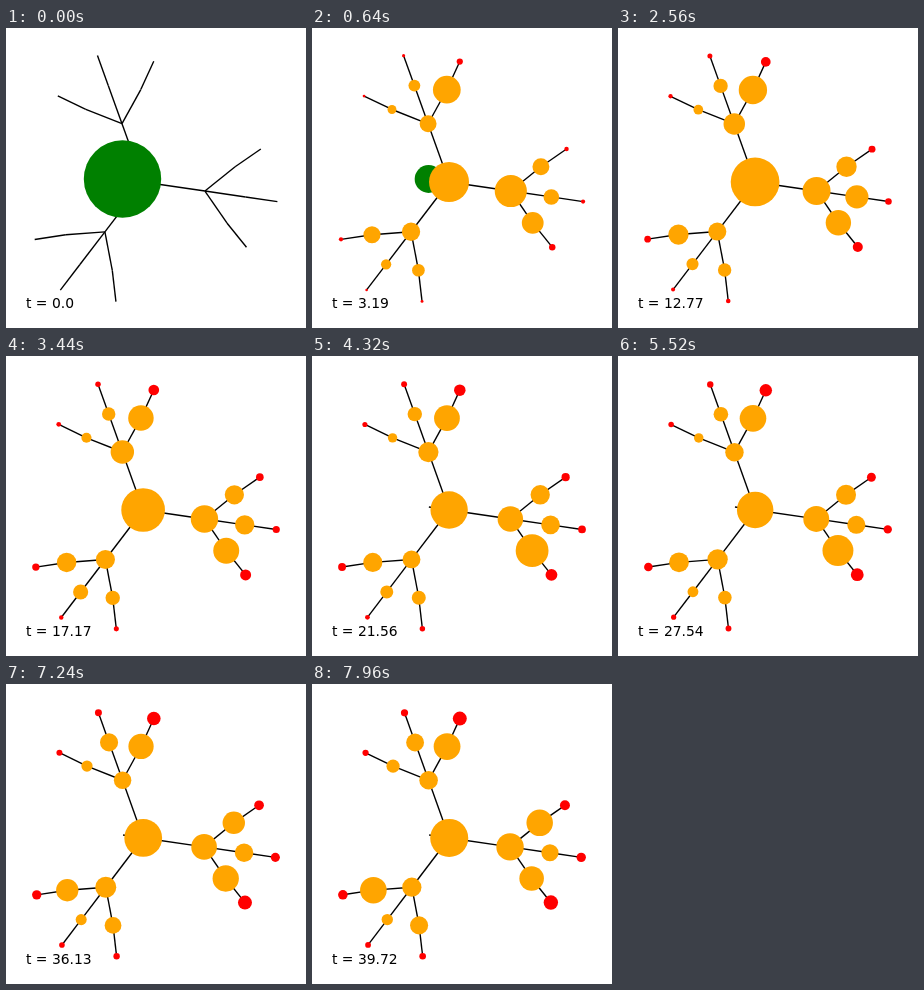
Recreate the animation shown at these times as an HTML page with a canvas. Size 300 by 300 pixels, loop 8 s.

```html
<!DOCTYPE html>
<html lang="en">
<head>
<meta charset="utf-8">
<title>Flow through a branching network</title>
<style>
  html, body { margin: 0; width: 100%; height: 100%; overflow: hidden; background: #fff; }
  canvas { display: block; width: 300px; height: 300px; }
</style>
</head>
<body>
<canvas id="stage"></canvas>
<script>
const LOOP = 8000, STEP = 40, TIME_PER_STEP = 100 / 501;
const LAST_TIME = (LOOP / STEP - 1) * TIME_PER_STEP;

const source = { x: 116.5, y: 151 };
const center = { x: 137, y: 154, depth: 0, radius: 19, peak: 12, children: [] };

function polar(distance, degrees) {
  const angle = degrees * Math.PI / 180;
  return { x: center.x + distance * Math.cos(angle), y: center.y + distance * Math.sin(angle) };
}

// Every arm has the same shape: a hub with three twigs, each a node and a leaf.
function addArm(heading, spread, reach, radius, peak, twigs) {
  const hub = { ...polar(62.4 * reach, heading), depth: 1, radius, peak, children: [] };
  center.children.push(hub);
  twigs.forEach((twig, i) => {
    const side = i - 1;
    const length = side ? reach : 1.11 * reach;
    const leaf = {
      ...polar(122 * length, heading + side * spread),
      leafRadius: twig.leaf, children: []
    };
    hub.children.push({
      ...polar(93.1 * length, heading + side * spread * 0.74),
      depth: 2, radius: twig.radius, peak: twig.peak, children: [leaf]
    });
  });
}

addArm(-109.8, 24.9, 0.993, 9, 17, [
  { radius: 4.9, peak: 40, leaf: 3.1 },
  { radius: 7, peak: 38, leaf: 3.6 },
  { radius: 13, peak: 6, leaf: 7 }
]);
addArm(8.3, 23.95, 1.003, 13.3, 6, [
  { radius: 9.8, peak: 40, leaf: 5 },
  { radius: 8.9, peak: 12, leaf: 4.7 },
  { radius: 12.7, peak: 24, leaf: 7.2 }
]);
addArm(127.4, 24.65, 1.005, 9.2, 32, [
  { radius: 7, peak: 40, leaf: 3.3 },
  { radius: 5.6, peak: 18, leaf: 2.9 },
  { radius: 9.8, peak: 40, leaf: 4.8 }
]);

const canvas = document.getElementById('stage');
const ratio = window.devicePixelRatio || 1;
canvas.width = canvas.height = 300 * ratio;
const ctx = canvas.getContext('2d');
ctx.scale(ratio, ratio);
ctx.font = '13.89px "DejaVu Sans", sans-serif';
ctx.lineWidth = 1.39;

// A node fills up later the deeper it lies, then ripples and swells once around its peak.
function nodeRadius({ x, depth, radius, peak }, t) {
  const filled = 1 - Math.exp(-t / (0.5 + 0.5 * depth));
  const swell = 0.32 * Math.exp(-(((t - peak) / 5) ** 2));
  const ripple = 0.04 * Math.sin(0.9 * t + x);
  return radius * filled * (1 + swell + ripple);
}

function draw(t) {
  const progress = t / LAST_TIME;
  // The plot shrinks slightly as the leaves fill up.
  const shrink = progress ** 0.75;
  const place = ({ x, y }) => [
    150 + (x - 150) * (1 - 0.018 * shrink),
    150 + (y - 150) * (1 - 0.011 * shrink)
  ];

  function line(from, to) {
    ctx.beginPath();
    ctx.moveTo(...place(from));
    ctx.lineTo(...place(to));
    ctx.stroke();
  }

  function disc(at, radius, color) {
    ctx.fillStyle = color;
    ctx.beginPath();
    ctx.arc(...place(at), radius, 0, 2 * Math.PI);
    ctx.fill();
  }

  function edges(parent) {
    for (const child of parent.children) {
      line(parent, child);
      edges(child);
    }
  }

  function discs(item) {
    if (item.leafRadius) disc(item, item.leafRadius * progress ** 0.32, 'red');
    else disc(item, nodeRadius(item, t), 'orange');
    item.children.forEach(discs);
  }

  ctx.fillStyle = '#fff';
  ctx.fillRect(0, 0, 300, 300);
  line(source, center);
  edges(center);
  disc(source, 38.7 * Math.exp(-0.32 * t), 'green');
  discs(center);

  const rounded = Math.round(t * 100) / 100;
  const label = Number.isInteger(rounded) ? rounded.toFixed(1) : String(rounded);
  ctx.fillStyle = '#000';
  ctx.fillText('t = ' + label, 20, 280);
}

function tick(now) {
  draw(Math.floor((now % LOOP) / STEP) * TIME_PER_STEP);
  requestAnimationFrame(tick);
}

draw(0);
requestAnimationFrame(tick);
</script>
</body>
</html>
```
